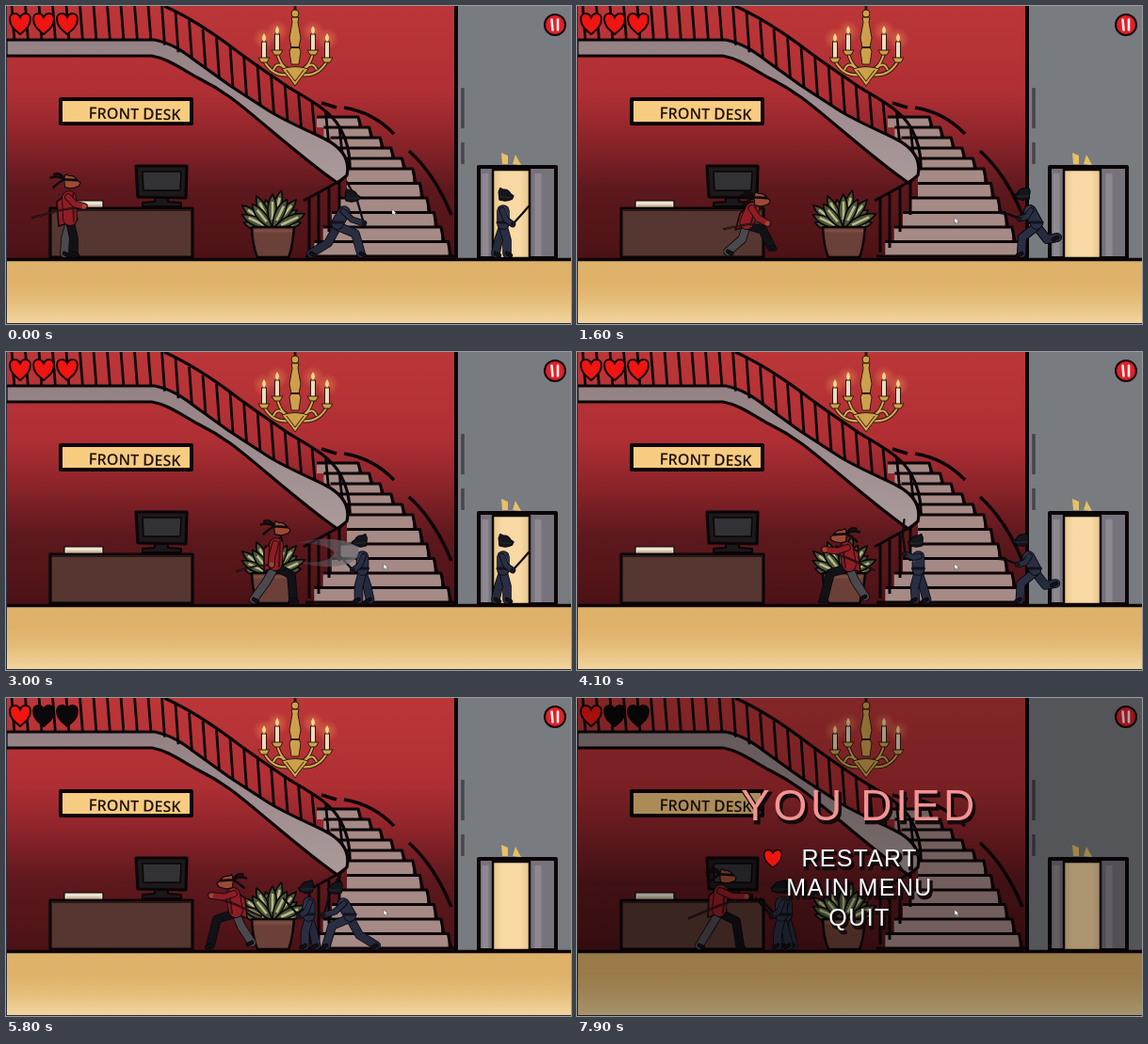
Animation, 600 px wide and 338 px high, one loop 8000 ms. Source, as an HTML page:

```html
<!DOCTYPE html>
<html lang="en">
<head>
<meta charset="utf-8">
<title>Lobby fight</title>
<style>
html, body { margin: 0; width: 100%; height: 100%; overflow: hidden; background: #000; }
svg { display: block; width: 100vw; height: 100vh; }
.menu { font-family: "Liberation Sans", Arial, sans-serif; text-anchor: middle; }
</style>
</head>
<body>
<svg viewBox="0 0 600 338" preserveAspectRatio="none">
  <defs>
    <linearGradient id="wall" x2="0" y2="1">
      <stop offset="0" stop-color="#bc3638"/><stop offset=".27" stop-color="#b02f34"/>
      <stop offset=".42" stop-color="#8c242a"/><stop offset=".58" stop-color="#5c181d"/>
      <stop offset=".7" stop-color="#541519"/><stop offset=".8" stop-color="#4a1216"/>
    </linearGradient>
    <linearGradient id="floor" x2="0" y2="1">
      <stop offset="0" stop-color="#deb26c"/><stop offset=".35" stop-color="#dfb169"/>
      <stop offset=".65" stop-color="#e5bd79"/><stop offset="1" stop-color="#f2d6a0"/>
    </linearGradient>
    <linearGradient id="band" x2="0" y2="1">
      <stop offset="0" stop-color="#938184"/><stop offset="1" stop-color="#ab9a9a"/>
    </linearGradient>
    <linearGradient id="light">
      <stop offset="0" stop-color="#e6c48c"/><stop offset=".25" stop-color="#f9d9a4"/>
      <stop offset=".75" stop-color="#f9d9a4"/><stop offset="1" stop-color="#e6c48c"/>
    </linearGradient>
    <linearGradient id="arc">
      <stop offset="0" stop-color="#555" stop-opacity=".15"/><stop offset="1" stop-color="#77747a" stop-opacity=".9"/>
    </linearGradient>
    <radialGradient id="glow"><stop stop-color="#ffb060" stop-opacity=".4"/><stop offset="1" stop-color="#ffb060" stop-opacity="0"/></radialGradient>
    <filter id="soft"><feGaussianBlur stdDeviation=".7"/></filter>
    <path id="heart" d="M0,12C-6,7-11,3-11,-4C-11,-11-3,-12 0,-6C3,-12 11,-11 11,-4C11,3 6,7 0,12Z"/>
  </defs>

  <rect width="600" height="338" fill="url(#wall)"/>
  <g filter="url(#soft)" stroke="#0b0507" stroke-width="3.2" fill="none" stroke-linejoin="round">
    <g id="steps"></g>
    <path d="M0,36H158C178,40 190,50 205,61L237,84L280,112C300,124 320,132 338,141C356,150 366,162 362,180L352,188C330,173 305,152 280,131C250,106 235,92 205,77C185,66 172,56 155,53H0Z" fill="url(#band)"/>
    <g id="balusters" stroke-width="2.8"></g>
    <path d="M168,0C195,12 222,30 248,50C270,66 285,76 301,87C325,101 345,112 355,130Q366,150 365,174"/>
    <path d="M335,103l16,5M359,108Q390,113 412,136M428,154C448,172 462,195 473,222" stroke-width="3.6"/>
    <path d="M316,207L358,184M322,205V262M332,200V257M343,194V240M354,187V222" stroke-width="3"/>

    <rect x="480" y="-5" width="125" height="274" fill="#787b80" stroke="none"/>
    <path d="M478,-5V268" stroke-width="4"/>
    <path d="M485,87V130M485,145V168" stroke="#4a434e" stroke-width="3.5"/>
    <rect x="502" y="171" width="82" height="97" fill="#77737c" stroke-width="4"/>
    <path d="M509,178V266M565,178V266" stroke="#8e8890" stroke-width="7"/>
    <rect x="517" y="174" width="39" height="94" fill="url(#light)" stroke-width="2.5"/>
    <path d="M526,156l7,3v9h-6ZM541,158l6,11l-9,-1Z" fill="#e8c064" stroke="none"/>

    <rect x="47" y="215" width="151" height="52" fill="#553630"/>
    <path d="M48,217H197" stroke="#2a1715" stroke-width="2"/>
    <rect x="62" y="207" width="41" height="7" fill="#eee4d4" stroke-width="1.2"/>
    <path d="M64,212H101" stroke="#b99c67" stroke-width="1"/>
    <path d="M158,203h14v5l14,1v4h-41v-4l13,-1Z" fill="#1b171a" stroke-width="2"/>
    <path d="M138,170H192L191,204L140,203Z" fill="#1c191b"/>
    <path d="M145,176H186L185,196H146Z" fill="#323136" stroke-width="1.5"/>

    <g id="plant" stroke-width="1.6"></g>
    <path d="M261,235H306Q304,258 300,267H267Q262,256 261,235Z" fill="#6b4038" stroke-width="2.5"/>
    <path d="M263,239H304" stroke="#7d4d43" stroke-width="3"/>

    <rect x="58" y="99" width="139" height="26" fill="#f7cb80" stroke-width="4"/>
  </g>
  <text transform="translate(87.5 119.5) rotate(1)" font-family="'Open Sans', 'Noto Sans', sans-serif" font-size="16" font-weight="600" fill="#21130d"><tspan font-size="17">F</tspan>RONT <tspan font-size="17">D</tspan>ESK</text>

  <g id="lamp" stroke="#2d1b0c" stroke-width="1" fill="#cda04c"></g>

  <rect y="268" width="600" height="70" fill="url(#floor)"/>
  <path d="M0,269.5H600" stroke="#0b0507" stroke-width="3.5"/>
  <path d="M.5,0V338M0,337.5H600" stroke="#2a2c3c"/>

  <g id="actors" fill="none" stroke-linecap="round" stroke-linejoin="round"></g>

  <g id="hearts" stroke="#120405" stroke-width="2"></g>
  <circle cx="583" cy="20" r="11" fill="#e0202a" stroke="#160507" stroke-width="2"/>
  <path d="M579.5,14.5L580.5,25.5M586,14.5V25.5" stroke="#fbeeea" stroke-width="2.6" stroke-linecap="round"/>

  <g id="death">
    <rect width="600" height="338" opacity=".31"/>
    <g class="menu" id="menu"></g>
    <use href="#heart" transform="translate(208 170) scale(.85)" fill="#f0140e" stroke="#120405" stroke-width="1.6"/>
  </g>
  <path id="cursor" d="M0,0V6L1.6,4.8L3,7L4,6.4L2.8,4.3H4.6Z" fill="#fff" stroke="#333" stroke-width=".4"/>
</svg>

<script>
const $ = id => document.getElementById(id);
const lerp = (a, b, k) => a + (b - a) * k;
const clamp = v => Math.max(0, Math.min(1, v));

// Piecewise linear value through [position, value] pairs
function track(points, p) {
  let i = 0;
  while (i < points.length - 2 && p >= points[i + 1][0]) i++;
  const [a, b] = [points[i], points[i + 1]];
  return lerp(a[1], b[1], clamp((p - a[0]) / (b[0] - a[0])));
}

function buildScene() {
  const left = [[0, 330], [3, 352], [5, 362], [6, 362], [8, 346], [11, 318]];
  const right = [[0, 374], [5, 432], [11, 477]];
  const top = [[0, 118], [5, 173], [11, 266]];
  let html = '';
  for (let i = 0; i < 11; i++) {
    const y = track(top, i), end = track(top, i + 1);
    const l = track(left, i), r = track(right, i);
    html += `<rect x="${l}" y="${y}" width="${r - l}" height="${end - y}" fill="#a58a86" stroke="none"/>
      <path d="M${l},${y}H${r}L${r + 3},${end}"/>`;
  }
  $('steps').innerHTML = html + '<path d="M318,266H478"/>';

  const foot = [[160, 37], [205, 61], [237, 84], [280, 112], [338, 141], [362, 160]];
  const rail = [[168, 0], [248, 50], [301, 87], [345, 117], [362, 140]];
  html = '';
  for (let x = 6; x < 360; x += 14.5)
    html += `<path d="M${x},${track(rail, x) - 1}L${x + 3},${track(foot, x + 3)}"/>`;
  $('balusters').innerHTML = html;

  html = '';
  for (let i = 0; i < 13; i++) {
    const n = i * 5 % 13;
    const size = 31 + n * 5 % 12;
    html += `<g transform="translate(283 237) rotate(${-78 + n * 13})">
      <path d="M0,0C-7,${-size * .4} -6,${-size * .75} 0,${-size}C5,${-size * .75} 6,${-size * .4} 0,0Z" fill="#4b573c"/>
      <path d="M0,-10V${-size + 8}" stroke="#b9bb84" stroke-width="2.6"/></g>`;
  }
  $('plant').innerHTML = html;

  html = '<path d="M307,0V8" stroke-width="3"/><circle cx="307" cy="8" r="4"/><path d="M303,12h8l-1,5 3,17 -2,10 2,4 -2,14h-8l-2,-14 2,-4 -2,-10 3,-17Z"/><path d="M302,44h10" stroke-width="2"/>';
  const arms = d => `<path d="M307,72Q284,78 274,58M307,68Q293,70 288,50M307,72Q331,78 341,58M307,68Q321,70 326,50M296,66q-8,-8 -12,2M318,66q8,-8 12,2" fill="none" ${d}/>`;
  html += arms('stroke-width="4"') + arms('stroke="#d3a957" stroke-width="2"');
  html += '<path d="M293,67Q307,62 321,67L312,78L307,85L302,78Z"/><path d="M298,68L307,80L316,68" fill="none"/>';
  for (const [x, y] of [[274, 57], [288, 49], [326, 49], [341, 57]])
    html += `<circle cx="${x}" cy="${y - 22}" r="12" fill="url(#glow)" stroke="none"/>
      <rect x="${x - 2.5}" y="${y - 19}" width="5" height="19" fill="#eadcc0"/>
      <path d="M${x},${y - 28}q4,6 0,9q-4,-3 0,-9Z" fill="#ffd98c" stroke="none"/>
      <path d="M${x - 6},${y - 2}h12l-3,5h-6Z"/>`;
  $('lamp').innerHTML = html;

  const line = (text, y, size, gap, color) => ['#140a0c', color].map((c, i) =>
    `<text x="${i ? 300 : 302}" y="${i ? y : y + 2.5}" font-size="${size}" letter-spacing="${gap}" fill="${c}" stroke="#140a0c" stroke-width="${i ? 0 : 2.5}">${text}</text>`).join('');
  $('menu').innerHTML = line('YOU DIED', 130, 46, 3.7, '#f39393') + line('RESTART', 179, 25, 1.2, '#fff')
    + line('MAIN MENU', 210, 25, 1.4, '#fff') + line('QUIT', 242, 25, 1.4, '#fff');
}

// Joints: head, neck, hip, front knee, front foot, back knee, back foot, hand, sword tip.
// x points forward, y = 0 is the ground.
const pose = text => text.split(' ').map(p => p.split(',').map(Number));
const foxPoses = {
  idle: pose('0,-80 -1,-69 0,-38 4,-20 4,-4 -5,-20 -6,-4 15,-54 -40,-42'),
  run: pose('10,-61 2,-57 -4,-34 13,-29 22,-11 -9,-19 -24,-6 18,-36 -28,-30'),
  lunge: pose('1,-79 -3,-68 -4,-39 13,-30 15,-4 -14,-22 -27,-4 -8,-41 -45,-34'),
  clash: pose('3,-77 -2,-67 -4,-39 14,-30 18,-4 -14,-22 -25,-4 25,-56 -36,-33'),
  guard: pose('5,-71 -1,-64 -4,-38 16,-32 23,-4 -10,-24 -21,-7 22,-57 -31,-35')
};
const ninjaPoses = {
  idle: pose('1,-66 0,-55 0,-33 4,-18 4,-4 -5,-18 -8,-4 10,-35 27,-54'),
  raise: pose('1,-66 0,-55 0,-33 4,-18 3,-4 -5,-18 -9,-4 14,-52 15,-89'),
  dash: pose('14,-65 7,-54 0,-33 19,-25 25,-4 -10,-15 -28,-4 28,-36 10,-80'),
  run: pose('13,-67 7,-55 0,-33 15,-21 16,-4 -11,-19 -22,-21 18,-41 39,-47')
};

// [time, x, pose, facing, time of the full stride]
const fox = [
  [0, 68, 'idle', 1], [500, 68, 'run', 1, 1600], [2600, 290, 'guard', 1], [2900, 290, 'lunge', 1],
  [3200, 290, 'guard', 1], [3800, 285, 'guard', -1], [5100, 285, 'run', -1, 5800], [5500, 240, 'guard', -1],
  [5900, 240, 'run', -1, 5800], [6400, 116, 'run', 1, 6800], [6700, 150, 'lunge', 1], [7000, 150, 'guard', 1],
  [7300, 155, 'clash', 1], [8000, 155, 'clash', 1]
];
const ninjas = [[
  [0, 528, 'idle', 1], [1100, 528, 'run', -1, 1600], [1700, 480, 'run', 1, 1600], [2300, 528, 'idle', 1],
  [3500, 528, 'run', -1, 4100], [4900, 431, 'dash', -1, 5800], [6200, 336, 'run', -1, 6800],
  [7700, 222, 'idle', -1], [8000, 222, 'idle', -1]
], [
  [0, 352, 'dash', 1, 0], [1300, 515, 'run', -1, 1600], [2800, 380, 'idle', -1], [3600, 374, 'idle', -1],
  [3900, 364, 'raise', -1], [4300, 361, 'idle', -1], [4700, 355, 'raise', -1], [5000, 348, 'idle', -1],
  [6000, 315, 'run', -1, 6800], [7200, 240, 'raise', -1], [7500, 217, 'idle', -1], [8000, 217, 'idle', -1]
]];

const limb = (points, width, color) => [['#08080c', width + 1.6], [color, width]].map(([c, w]) =>
  `<path d="M${points.join('L')}" stroke="${c}" stroke-width="${w}"/>`).join('');

function joints(poses, [, , name, , stride], t) {
  const p = poses[name];
  if (stride === undefined) return p;
  const k = (1 - Math.cos((t - stride) / 600 * 2 * Math.PI)) / 2;
  const swapped = [...p.slice(0, 3), p[5], p[6], p[3], p[4], ...p.slice(7)];
  return p.map((a, i) => a.map((v, j) => lerp(v, swapped[i][j], k)));
}

function actor(keys, poses, isFox, t) {
  const key = keys.findLast(k => k[0] <= t);
  const [head, neck, hip, kneeF, footF, kneeB, footB, hand, tip] = joints(poses, key, t);
  const cloth = isFox ? '#8e1d24' : '#292e43';
  const elbow = [(neck[0] + hand[0]) / 2 - 2, (neck[1] + hand[1]) / 2 + 5];
  const shoe = foot => limb([foot, [foot[0] + 4, foot[1] + 2]], 3, '#111116');
  let out = limb([hip, kneeB, footB], 8, isFox ? '#4b494e' : '#252a3d') + shoe(footB)
    + limb([hip, kneeF, footF], 8, isFox ? '#121216' : cloth) + shoe(footF);
  if (isFox)
    out += `<path d="M${neck}L${hip[0] + 8},${hip[1] - 2}L${hip[0] - 12},${hip[1] + 5}L${neck[0] - 13},${neck[1] + 10}Z" fill="${cloth}" stroke="#14090b" stroke-width="1.6"/>`;
  out += limb([[neck[0], neck[1] + 6], [hip[0], hip[1] - 3]], isFox ? 14 : 12, cloth);
  out += isFox
    ? `<path d="M${neck[0] + 4},${neck[1] + 2}L${hip[0] + 4},${hip[1]}" stroke="#3d1214" stroke-width="2"/>`
    : `<path d="M${hip[0] - 6},${hip[1] - 4}h12" stroke="#11131c" stroke-width="3"/><path d="M${neck[0] + 1},${neck[1] + 2}l4,9" stroke="#777b89"/>`;
  const bend = [(hand[0] + tip[0]) / 2 + 2, (hand[1] + tip[1]) / 2 - 2];
  out += limb([hand, bend, tip], .6, isFox ? '#6b2c28' : '#15161c');
  out += limb([[neck[0] - 1, neck[1] + 5], elbow, hand], isFox ? 6 : 5, cloth)
    + `<circle cx="${hand[0]}" cy="${hand[1]}" r="2.4" fill="${isFox ? '#9b4a31' : '#15161d'}"/>`;
  out += `<g transform="translate(${head}) scale(${isFox ? .92 : .85})"><path d="M-7,-4L-5,-9L-1,-7Q5,-8 8,-2L12,1L10,5Q2,9 -6,6Z" fill="${isFox ? '#9c4b32' : '#14161c'}" stroke="#08080c" stroke-width="1.2"/>`
    + (isFox
      ? '<path d="M-7,-3L8,-2M-7,-3Q-13,-8 -22,-5M-7,-3Q-12,0 -19,6M-7,-4Q-11,-11 -18,-9" stroke="#0d0b0e" stroke-width="2.8"/>'
      : '<path d="M-6,2L8,3" stroke="#2b2d35"/>') + '</g>';
  if (key[2] === 'lunge') {
    const w = t < 5000 ? 84 : 44;
    out += `<path d="M18,-64Q${w * .7},-74 ${w},-60Q${w + 3},-45 ${w - 14},-41Q${w * .55},-35 16,-45Q${w * .65},-40 ${w * .7},-54Q${w * .6},-64 18,-64Z" fill="url(#arc)"/>`;
  }
  return `<g transform="translate(${track(keys, t)} 267) scale(${key[3]} 1)">${out}</g>`;
}

function draw(now) {
  const t = Math.floor(now % 8000 / 100) * 100;
  $('actors').innerHTML = ninjas.map(n => actor(n, ninjaPoses, false, t)).join('') + actor(fox, foxPoses, true, t);
  const lives = t < 4300 ? 3 : t < 5000 ? 2 : 1;
  $('hearts').innerHTML = [0, 1, 2].map(i =>
    `<use href="#heart" transform="translate(${15 + i * 25} 18)" fill="${i < lives ? '#ee1512' : '#09080a'}"/>`).join('');
  $('death').setAttribute('opacity', clamp((t - 7300) / 500));
  $('cursor').setAttribute('transform', `translate(${track([[0, 410], [900, 401]], t)} ${track([[0, 216], [900, 225]], t)})`);
  requestAnimationFrame(draw);
}

buildScene();
requestAnimationFrame(draw);
</script>
</body>
</html>
```
